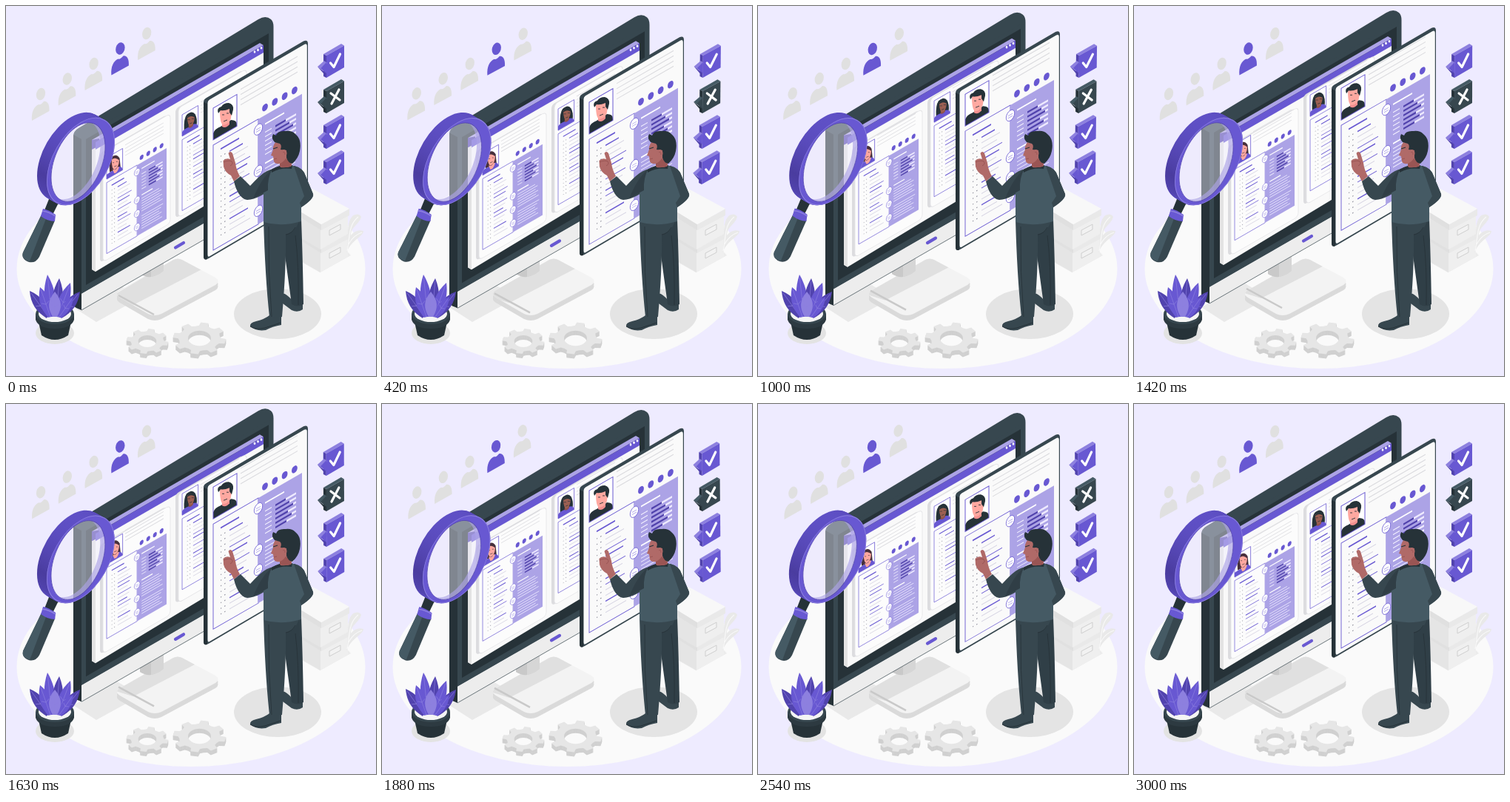
Recreate the animation shown at these times as an HTML page. Size 500 px wide and 500 px high, loop 3040 ms.

```html
<!DOCTYPE html>
<html lang="en">
<head>
<meta charset="utf-8">
<title>Choosing a candidate</title>
<style>
html, body { margin: 0; width: 100%; height: 100%; overflow: hidden; background: #eeebff; }
svg { display: block; width: 100vw; height: 100vh; }
</style>
</head>
<body>
<svg id="stage" viewBox="0 0 500 500"></svg>
<script>
const LOOP = 3040, SWING = 3000, SLOPE = 0.577;
const C = {
  main: '#6858d2', deep: '#5143ae', soft: '#aca3e6', pale: '#8d80df',
  ink: '#263238', slate: '#37474f', steel: '#455a64',
  skin: '#b06a68', skinDark: '#9a5554', pink: '#ffa8a0'
};

const path = (d, fill, extra = '') => `<path d="${d}" fill="${fill}" ${extra}/>`;
const stroke = (d, color, w = 1, extra = '') =>
  `<path d="${d}" fill="none" stroke="${color}" stroke-width="${w}" ${extra}/>`;
const rect = (x, y, w, h, fill, extra = '') =>
  `<rect x="${x}" y="${y}" width="${w}" height="${h}" fill="${fill}" ${extra}/>`;
const oval = (x, y, rx, ry, fill, extra = '') =>
  `<ellipse cx="${x}" cy="${y}" rx="${rx}" ry="${ry}" fill="${fill}" ${extra}/>`;
const line = (x1, x2, y, color, w) => stroke(`M${x1} ${y}H${x2}`, color, w);
const at = (x, y, inner) => `<g transform="translate(${x} ${y})">${inner}</g>`;
// Plane facing the viewer's left: x runs up and to the right.
const wall = (x, y, inner, s = 1) =>
  `<g transform="matrix(${s} ${-SLOPE * s} 0 ${s} ${x} ${y})">${inner}</g>`;
const lift = (height, inner) => `<g data-lift="${height}">${inner}</g>`;
const tilt = (x, y, inner) => `<g data-tilt="${x} ${y}">${inner}</g>`;

function people() {
  return [0, 1, 2, 3, 4].map(i => at(47 + i * 35.8, 119 - i * 20.5,
    oval(0, 0, 6, 8.4, i === 3 ? C.main : '#e0e0e0', 'transform="rotate(16)"') +
    path('M-12 36C-13 24-9 17-3 14Q0 15 4 10C9 9 12 14 11.500 23Z', i === 3 ? C.main : '#e0e0e0')
  )).join('');
}

function badge(y, crossed) {
  const [top, front, side] = crossed ? [C.steel, C.slate, C.ink] : [C.pale, C.main, C.deep];
  const mark = crossed ? 'M439 70L451 79M450 65L440 84' : 'M438.500 77L443 82.500L451.500 65';
  return at(0, y,
    path('M429 65L453 51L457 53.500L433 67Z', top) +
    path('M429 65L433 67V97L429 95Z', side) +
    path('M433 67L457 53.500V83L433 97Z', front) +
    path('M421 82L430 74L434 77L425 85Z', top) +
    path('M421 82L425 85L433 91L429 91Z', side) +
    path('M425 84.500L433 76V91Z', front) +
    stroke(mark, '#fff', 3.2, 'stroke-linecap="round" stroke-linejoin="round"'));
}

function gear(x, y, rx) {
  const teeth = 8, ry = rx * 0.6, pts = [];
  for (let i = 0; i < teeth; i++) {
    [[-0.5, 0.77], [-0.27, 0.8], [-0.19, 1], [0.19, 1], [0.27, 0.8]].forEach(([o, r]) => {
      const a = (i + o + 0.25) / teeth * 2 * Math.PI;
      pts.push(`${(rx * r * Math.cos(a)).toFixed(1)} ${(ry * r * Math.sin(a)).toFixed(1)}`);
    });
  }
  const h = rx * 0.43, k = ry * 0.47;
  const d = `M${pts.join('L')}ZM${-h} 0A${h} ${k} 0 1 0 ${h} 0A${h} ${k} 0 1 0 ${-h} 0Z`;
  const layers = [6, 5, 4, 3, 2, 1].map(o =>
    at(0, o, path(d, '#d0d0d0', 'fill-rule="evenodd"'))).join('');
  return at(x, y, layers + path(d, '#e6e6e6', 'fill-rule="evenodd"'));
}

function resume(face) {
  let s = '';
  for (let i = 0; i < 4; i++) {
    s += line(37, 114, -4 + i * 7, '#d9d9dd', 1.2) + oval(70 + i * 13.3, 39.500, 3.9, 4.7, C.main);
  }
  s += rect(0, 50, 61, 142, 'none', `stroke="${C.main}" stroke-width="0.9"`);
  s += rect(61, 50, 59, 142, C.soft);
  s += line(10, 35, 61, C.main, 2);
  for (let i = 0; i < 15; i++) {
    const y = 71 + i * 7.6, strong = i % 4 === 0;
    s += rect(10, y - 0.6, 1.2, 1.2, '#8b8b98') + rect(15, y - 0.6, 1.5, 1.2, '#8b8b98');
    s += line(22, 40 + (i * 7) % 11, y, strong || i % 3 === 0 ? C.main : '#d3d0e0', strong ? 1.6 : 1);
  }
  s += line(70, 96, 62, '#fff', 2);
  for (let i = 0; i < 6; i++) {
    const y = 73 + i * 6, end = 98 + (i * 5) % 12;
    s += line(70, 79, y, '#f4f2ff', 1.2) + line(84, 112, y, '#eeeaff', 2.8) + line(84, end, y, C.deep, 2.8);
  }
  s += line(70, 92, 115, '#fff', 2);
  for (let i = 0; i < 13; i++) {
    if (i !== 6) s += line(70, 105 + (i * 5) % 9, 122 + i * 5, '#eeebff', 1.1);
  }
  [64, 120, 147, 174].forEach(y => {
    s += oval(61, y, 5.7, 7, '#fff', `stroke="${C.main}" stroke-width="0.7"`) +
      stroke(`M58 ${y - 1}h6M58 ${y + 2}h6`, C.soft, 0.9);
  });
  return rect(0, 0, 32, 43, '#fff') + face +
    rect(0, 0, 32, 43, 'none', `stroke="${C.main}" stroke-width="1"`) + s;
}

const portrait = (body, head) =>
  `<g transform="matrix(1 ${SLOPE} 0 1 0 0)">${body}${at(0, -4, head)}</g>`;
const faceMan = portrait(
  path('M0 43V34Q2 28 10 25L24 16Q32 16 32 22V24.500Z', C.ink),
  path('M12 22V29Q17 32 22 26V18Z', '#f28f8f') +
  path('M9 8Q9 26 14 27Q24 25 24.500 14V4L12 5Z', C.pink) +
  path('M7 11Q4 4 11 2Q14-3 21-3Q28-1 27 6L25 14L22 10V5Q15 8 10 7Z', C.ink) +
  stroke('M12 13h3M18 11h3M14 22l5-2', C.ink, 0.9));
const faceDark = portrait(
  path('M4 30Q3 8 9 0Q20-10 26-1Q31 7 29 22Z', C.ink) +
  path('M0 43V35Q3 29 13 25L22 19Q31 16 32 24.500Z', C.main),
  path('M13 24V30Q19 31 22 25V18Z', '#8f5349') +
  path('M10 8Q11 27 17 27Q25 22 25 7Q17 1 10 8Z', '#9c5f52') +
  path('M8 13Q12 3 19 4Q25 2 26 10Q17 3 8 13Z', C.ink) +
  stroke('M11 14h5M19 12h5M15 22l5-2', C.ink, 1));
const faceLight = portrait(
  path('M6 29Q4 6 11-2Q20-9 26 1L28 20Z', '#47303c') +
  path('M0 43V34Q8 27 16 25L24 18Q31 17 32 24.500Z', C.main),
  path('M12 27Q18 31 22 22L25 23Q21 36 15 35Z', C.pink) +
  path('M10 8Q10 27 16 28Q25 23 25 9Q17 2 10 8Z', C.pink) +
  stroke('M12 14h3M19 12h3M15 22l5-2', C.ink, 0.9));

function stand() {
  const base = 'M154 384L226 343Q232 340 238 343L283 367Q290 372 283 377L210 416Q201 420 192 416L154 394Q146 389 154 384Z';
  return path('M91 407L122 427L182 394L150 375Z', '#e9e9e9') +
    at(0, 7, path(base, '#dadada')) + at(0, 4, path(base, '#dadada')) +
    path(base, '#f3f3f3') +
    `<clipPath id="baseTop"><path d="${base}"/></clipPath>` +
    `<g clip-path="url(#baseTop)">${lift(9.5, path('M140 394L236 337L272 352L172 404Z', '#e0e0e0'))}</g>` +
    lift(9.5, stroke('M152 391L200 417', '#c9c9c9', 2.5)) +
    path('M181 330V362Q196 372 213 358V325Z', '#d6d6d6') +
    path('M181 330V362Q189 367 196 366V330Z', '#c9c9c9');
}

function monitor() {
  const shell =
    path('M91 176Q91 169 98 165L341 18Q351 12 358 18Q361.500 21 361.500 28V227L102 376Z', C.slate) +
    path('M91 174L102 180V411L95 408Q91 406 91 401Z', C.ink) +
    path('M102 182Q102 177 107 174L351 33Q361 27 361 37V240L102 389Z', C.slate) +
    path('M108 180L355 37V234L108 377Z', C.ink) +
    path('M102 389L361 240V262L102 411Z', '#ededed') +
    stroke('M102 411L361 262', '#4a575d', 0.8) +
    stroke('M229 326.500L240 320', C.main, 4.2, 'stroke-linecap="round"');
  const screen =
    path('M116 190L348 56V222L121 359L116 356Z', '#f9f9f9') +
    path('M116 188L121 190V359L116 356Z', '#e3e3e3') +
    path('M116 181L343 50L348 53L121 184Z', C.soft) +
    path('M116 181L126 179V189L116 194Z', C.deep) +
    path('M121 184L348 53V63L121 194Z', C.main) +
    [336, 340.500, 345].map(x => oval(x, 62 - (x - 336) * SLOPE, 1.3, 1.8, '#fff')).join('');
  const sheet = (x, y, w, h) =>
    wall(x - 4, y + 1, rect(0, 0, w, h, '#dcdcdf', 'rx="5"')) +
    wall(x, y, rect(0, 0, w, h, '#fcfcfc', 'rx="5" stroke="#e4e4e7" stroke-width="0.8"'));
  return lift(9.5, shell + screen + sheet(131, 198, 91, 148)) +
    lift(19, wall(136, 205, resume(faceLight), 0.675)) +
    lift(19, sheet(233, 138, 92, 148)) +
    lift(28.2, wall(238, 147, resume(faceDark), 0.675));
}

function panel() {
  return lift(18.8,
    path('M267 130Q267 126 271 124L402 47.500Q408 45 408 51V262L274 341Q267 345 267 338Z', C.slate) +
    path('M267 130L272 132V342Q267 344 267 338Z', C.ink) +
    path('M272.500 131Q272.500 128 275 126.500L403 52Q406.800 50 406.800 54V261L275.500 338Q272.500 340 272.500 336Z', '#fafafa')) +
    lift(28.2, wall(280, 138, resume(faceMan)));
}

function boxes() {
  const carton = y => at(0, y,
    path('M394 283L425 301V329L394 311Z', '#e5e5e5') +
    path('M425 301L462 281V308L425 329Z', '#efefef') +
    path('M387 271L426 295V303L387 279Z', '#e0e0e0') +
    path('M426 295L464 274V283L426 303Z', '#e9e9e9') +
    path('M387 271L414 247L464 274L426 295Z', '#f8f8f8') +
    path('M437 303L452 295V302L437 310Z', '#f2f2f2', 'stroke="#cfcfcf" stroke-width="1"'));
  return path('M380 335L424 360L466 337L450 320Z', '#ececec') + carton(31) + carton(0) +
    path('M460 336C464 316 458 294 469 283Q477 279 480 285C477 296 466 298 466 310Q473 301 483 304C483 312 463 318 460 336Z', '#e9e9e9') +
    stroke('M461 331C465 314 462 296 476 285M463 322Q469 310 481 306', '#f8f8f8', 1.2);
}

function plant() {
  // Leaf drawn along its own upward axis, then turned toward its tip.
  const leaf = (x, y, w, fill, bx = 66) => {
    const l = Math.hypot(x - bx, 420 - y), turn = Math.atan2(x - bx, 420 - y) * 180 / Math.PI;
    return `<g transform="translate(${bx} 420) rotate(${turn})">` +
      path(`M-3 0C${-w} ${-l * 0.35} ${-w} ${-l * 0.65} 0 ${-l}C${w} ${-l * 0.65} ${w} ${-l * 0.35} 3 0Z`, fill) +
      stroke(`M0 0V${4 - l}M${-w * 0.6} ${-l * 0.5}L0 ${-l * 0.42}L${w * 0.6} ${-l * 0.5}`, C.pale, 0.6) + '</g>';
  };
  return oval(66, 442, 26, 15, '#e3e3e3') +
    path('M42 418L48 445Q66 457 84 445L90 418Z', C.ink) +
    path('M40 416V424Q44 436 66 436Q88 436 92 424V416Z', '#2d3a41') +
    oval(66, 416, 26, 14, C.slate) + oval(66, 416, 22, 11, '#f4f4f4') +
    leaf(100, 386, 9, C.deep, 73) + leaf(32, 385, 9, C.deep, 57) +
    leaf(56, 363, 9, C.main, 62) + leaf(72, 368, 9, C.deep, 68) +
    leaf(87, 374, 9, C.main, 70) + leaf(46, 380, 9, C.main, 60) +
    leaf(91, 393, 7, C.main, 72) + leaf(66, 386, 10, C.pale);
}

function candidateViewer() {
  return oval(367, 416, 59, 34, '#e4e4e4') +
    path('M372 389Q377 386 387 398L401 403V410Q394 415 386 411L374 402Z', C.slate) +
    path('M356 418L372 420V431Q360 433 351 438Q338 440 330 433Q329 428 338 426Q350 423 356 418Z', C.slate) +
    stroke('M330 433Q338 438 350 435L371 428', C.ink, 1) +
    path('M370 288L399 288Q401 340 402 403Q394 408 386 403L376 330Z', '#303f47') +
    path('M348 288L396 290Q393 304 378 309Q379 350 373 420Q364 424 356 420Q350 365 348 288Z', C.slate) +
    stroke('M378 309Q386 308 391 299M355 298Q354 360 359 420M391 310Q396 350 395 404', C.ink, 0.8) +
    // pointing arm
    path('M308 237L304 229Q296 225 294 217L293.500 209Q297 205 303 207L300.500 199Q303 195 306 199L310 212Q311 221 316 230Z', C.skin) +
    stroke('M294 211Q301 208 305 210Q308 213 303 216', C.skinDark, 1) +
    path('M362 220C348 222 338 235 330 243L317 230L308 237C311 250 317 261 326 262C337 262 351 253 360 246Z', C.slate) +
    // torso and resting arm
    path('M360 220Q373 214 390 216Q402 219 405 230L415 254Q416 261 399 272L399 291Q372 299 348 292L348 251Q350 232 360 220Z', C.steel) +
    path('M389 216Q402 219 405 230L415 254Q417 260 399 272L397 266L403 257L399 245Z', C.slate) +
    path('M360 220Q353 232 354 249L334 260Q345 233 360 220Z', '#303e46') +
    path('M359 221Q372 213 387 215L386 220Q372 218 359 225Z', C.ink) +
    // head
    path('M364 184Q360 190 361 194L358 202L361 203L362 210Q364 214 370 213L371 218Q380 219 386 216V190Z', C.skin) +
    path('M370 213Q375 211 378 206L385 213V217Q377 219 370 217Z', C.skinDark) +
    path('M363 184Q358 179 361 173L365 175Q367 168 378 169Q386 168 391 173Q400 180 397 196Q395 206 387 213Q381 212 379 205L379 195L371 194Q373 188 370 186Z', C.ink) +
    oval(375.500, 199, 4, 5, C.skin) + stroke('M374 198Q377 196 377 201', C.skinDark, 0.8) +
    stroke('M361 193L367 191', C.ink, 1.3) + stroke('M362 207L366 206', C.skinDark, 1);
}

function magnifier() {
  const disc = (x, y, rx, ry, fill, extra) => wall(x, y, oval(0, 0, rx, ry, fill, extra));
  const hole = (x, y, rx, ry) => {
    const dy = rx * SLOPE, k = 0.5523, p = (a, b) => `${x + a * rx} ${y - a * dy + b * ry}`;
    return `M${p(1, 0)}C${p(1, k)} ${p(k, 1)} ${p(0, 1)}C${p(-k, 1)} ${p(-1, k)} ${p(-1, 0)}` +
      `C${p(-1, -k)} ${p(-k, -1)} ${p(0, -1)}C${p(k, -1)} ${p(1, -k)} ${p(1, 0)}Z`;
  };
  const lens = hole(97.5, 211, 36.5, 49), inner = hole(91, 208, 36.5, 49);
  let rim = '';
  for (let i = 0; i <= 12; i++) rim += disc(88 + i, 203 + i * 0.58, 46, 53, 'url(#band)');
  const stops = [[0, '#5f50c6'], [0.45, '#4a3c9f'], [0.7, '#5143ae'], [1, C.main]]
    .map(([o, color]) => `<stop offset="${o}" stop-color="${color}"/>`).join('');
  return `<linearGradient id="band" x2="0" y2="1">${stops}</linearGradient>` +
    `<mask id="open"><rect width="500" height="500" fill="#fff"/><path d="${lens}"/></mask>` +
    `<clipPath id="glass"><path d="${lens}"/></clipPath>` +
    path('M73 262L61 286L50 281L60 256Z', C.ink) +
    `<g mask="url(#open)">${rim}${disc(101, 210, 46, 53, C.main)}` +
    `${disc(101, 210, 45.5, 52.5, 'none', `stroke="${C.pale}" stroke-width="0.8"`)}</g>` +
    `<g clip-path="url(#glass)">${rect(55, 140, 90, 140, '#eeecfb', 'opacity="0.45"')}` +
    `${path(lens + inner, C.soft, 'fill-rule="evenodd" opacity="0.65"')}</g>` +
    path(lens, 'none', `stroke="${C.deep}" stroke-width="0.8"`) +
    path('M48 282L66 290L45 339Q40 348 31 346Q20 342 23 333Z', C.slate) +
    path('M48 282L55 285L32 345Q20 342 23 333Z', C.steel) +
    path('M50 274Q57 275 67 282L66 291Q56 291 47 284Z', C.main) +
    stroke('M49 277Q58 278 67 284', C.pale, 1.6);
}

const stage = document.getElementById('stage');
stage.innerHTML =
  rect(0, 0, 500, 500, '#eeebff') + oval(250, 355, 235.500, 135, '#fafafa') +
  tilt(118, 92, people()) + stand() + boxes() + gear(191, 453, 28.500) + gear(261.500, 449, 36) +
  monitor() + plant() + panel() + candidateViewer() +
  tilt(440, 146, [0, 1, 2, 3].map(i => badge(i * 48, i === 1)).join('')) +
  tilt(85, 245, magnifier());

const lifted = [...stage.querySelectorAll('[data-lift]')];
const tilted = [...stage.querySelectorAll('[data-tilt]')];

// Both swings are linear; the tilt runs a quarter turn ahead of the lift.
const wave = p => 1 - Math.abs(1 - 2 * (p % 1));

function draw(ms) {
  const p = Math.min(ms % LOOP, SWING) / SWING;
  const up = wave(p), turn = 2 * wave(p + 0.25) - 1;
  lifted.forEach(g => g.setAttribute('transform', `translate(0 ${-g.dataset.lift * up})`));
  tilted.forEach(g => g.setAttribute('transform', `rotate(${turn} ${g.dataset.tilt})`));
}

const start = performance.now();
function tick() {
  draw(performance.now() - start);
  requestAnimationFrame(tick);
}
tick();
</script>
</body>
</html>
```
